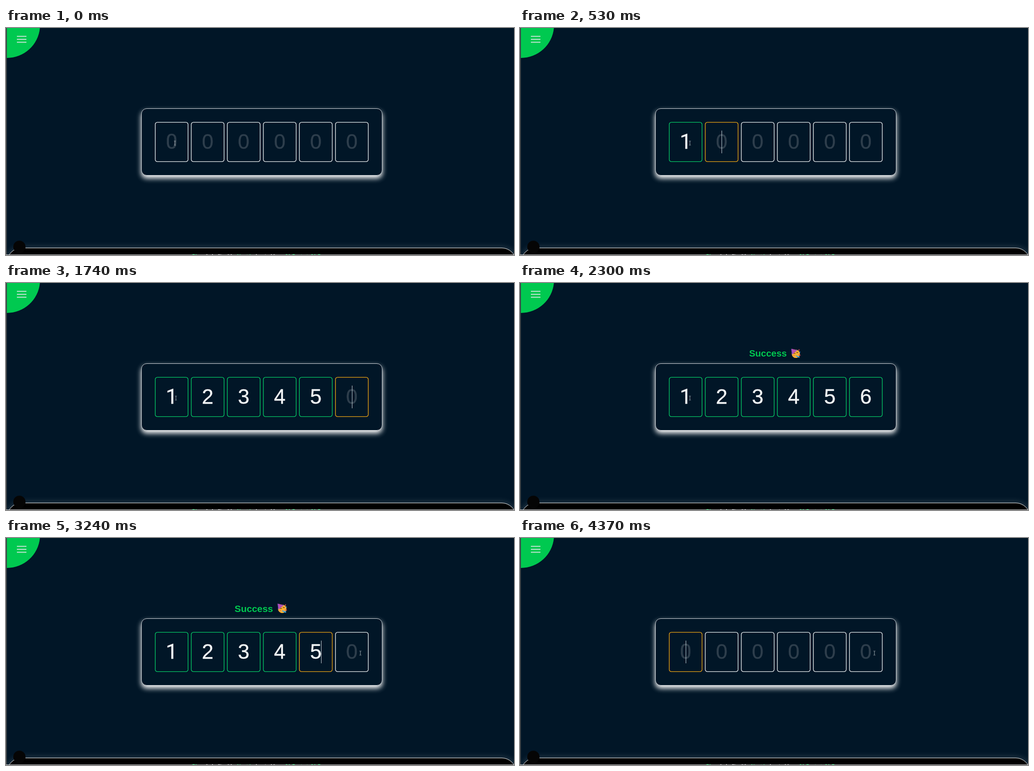
An HTML page that plays this animation: 1119x500 px, repeating every 4.44 s.

```html
<!DOCTYPE html>
<html lang="en">
<head>
<meta charset="utf-8">
<title>Code input</title>
<style>
  html, body { margin: 0; width: 100%; height: 100%; overflow: hidden; background: #011627; }
  #stage { position: relative; width: 1119px; height: 500px; overflow: hidden; background: #011627; }
  #stage > * { position: absolute; box-sizing: border-box; }
  .edge { left: 0; top: 0; width: 2px; height: 500px; background: #3b4044; }
  .base { left: 0; top: 499px; width: 1119px; height: 1px; background: #d9dbdd; }
  .card {
    left: 298px; top: 176.6px; width: 530.5px; height: 148px;
    border: 1px solid #d5d9dd; border-radius: 12px; background: #011627;
    box-shadow: 0 6px 12px #fff;
  }
  .footer {
    left: 2px; top: 484px; width: 1122px; height: 90px;
    border: 1.3px solid #f2f2f2; border-radius: 32px; background: #000;
    box-shadow: 0 0 16px rgba(255, 255, 255, .2);
  }
  svg { left: 0; top: 0; font-family: "Liberation Sans", Arial, sans-serif; }
  .digit { font-size: 45.8px; text-anchor: middle; stroke-width: .4; }
  .digit:first-of-type { font-family: Roboto, sans-serif; }
  .note { font-size: 11px; font-weight: bold; fill: #f3f4f6; }
  .green { fill: #00c950; }
</style>
</head>
<body>
<div id="stage">
  <div class="edge"></div>
  <div class="card"></div>
  <div class="footer"></div>
  <svg width="1119" height="500" viewBox="0 0 1119 500">
    <path class="green" d="M2 0H74.7A73 73 0 0 1 2 66Z"/>
    <path d="M24 18.4H45M24 24.9H45M24 31.4H45" stroke="#e4e7e9" stroke-width="1.7"/>
    <circle cx="29.5" cy="482" r="13.5" fill="#050505"/>
    <g class="note">
      <text x="410" y="505.5" class="green">Pinup</text>
      <text x="441" y="505.5">is built with</text>
      <text x="509" y="505.5" class="green">Next.js</text>
      <text x="550" y="505.5">hosted by:</text>
      <text x="615" y="505.5" class="green">21 Port st, 21 P</text>
    </g>
    <g id="success">
      <text x="500.4" y="163" font-size="22" font-weight="bold" class="green">Success</text>
      <g transform="translate(600 144)">
        <circle cx="11" cy="12" r="9.8" fill="#fdb233"/>
        <path d="M0 0L15 3.5L2 14Z" fill="#9a4fc4"/>
        <path d="M4 1L6 10M8 2L10 7" stroke="#e4558b" stroke-width="1.6"/>
        <path d="M6 12q2-2.5 4 0M12.5 10q2-2.5 4 0" fill="none" stroke="#5b3218" stroke-width="1.3"/>
        <circle cx="6.5" cy="16" r="1.9" fill="#f7863b"/>
        <path d="M10.5 15.5L20.5 18.5L19 21.5L10.5 17.5Z" fill="#3c9bdc"/>
        <path d="M17 14.5q4-1 4.5 2" fill="none" stroke="#e84d55" stroke-width="1.6"/>
        <circle cx="18.5" cy="3" r="1.3" fill="#e84d55"/>
        <circle cx="20.5" cy="8" r="1.2" fill="#3c9bdc"/>
      </g>
    </g>
    <g id="boxes"></g>
    <rect id="caret" y="226" width="1" height="50" fill="#cdd3d8"/>
    <path id="beam" d="M-2-4.5H-.6L0-4L.6-4.5H2M0-4V4M-2 4.5H-.6L0 4L.6 4.5H2"
      fill="none" stroke="#b4bbc1" stroke-width=".9"/>
    <path id="arrow" d="M0 0V11.5L2.7 9L4.5 13L6.4 12.2L4.7 8.3H8.3Z"
      fill="#fff" stroke="#111" stroke-width=".7"/>
  </svg>
  <div class="base"></div>
</div>
<script>
const LOOP = 4440;
const COUNT = 6, PITCH = 79.4;
const WHITE = "#f3f5f6", GREEN = "#06cf68", AMBER = "#f6a912", DIM = "#2e3e4c";

// Key presses and mouse clicks, in ms
const TYPED = [490, 670, 1010, 1340, 1740, 2100];
const ERASED = [3240, 3500, 3700, 3930, 4100, 4370];
const CLICKS = [400, 2470];
const EVENTS = [...TYPED, ...ERASED, ...CLICKS];
const DONE = TYPED[COUNT - 1];

const $ = id => document.getElementById(id);
const ramp = (t, from, to) => Math.min(1, Math.max(0, (t - from) / (to - from)));
const smooth = p => p * p * (3 - 2 * p);
const past = (times, t) => times.filter(time => time <= t);
const boxX = i => 328 + PITCH * i;
const middle = i => boxX(i) + 36.8;

function add(tag, attrs) {
  const el = document.createElementNS("http://www.w3.org/2000/svg", tag);
  for (const key in attrs) el.setAttribute(key, attrs[key]);
  return $("boxes").appendChild(el);
}

const boxes = Array.from({ length: COUNT }, (_, i) => ({
  frame: add("rect", {
    x: boxX(i) + .7, y: 207.6, width: 72.3, height: 86.8, rx: 5,
    fill: "none", "stroke-width": 1.35
  }),
  digit: add("text", { x: middle(i), y: 266.4, class: "digit" })
}));

function focusAt(t, filled) {
  const [first, second] = CLICKS;
  if (t < first || (t >= DONE && t < second)) return -1;
  return t < DONE ? filled : Math.max(0, filled - 1);
}

function drawBoxes(t) {
  const filled = past(TYPED, t).length - past(ERASED, t).length;
  const focus = focusAt(t, filled);
  boxes.forEach(({ frame, digit }, i) => {
    const full = i < filled;
    const ink = full ? WHITE : DIM;
    frame.setAttribute("stroke", i === focus ? AMBER : full ? GREEN : WHITE);
    digit.setAttribute("fill", ink);
    digit.setAttribute("stroke", ink);
    digit.textContent = full ? i + 1 : 0;
  });

  // The caret blinks, starting anew at each event.
  const idle = t - Math.max(0, ...past(EVENTS, t));
  const lit = focus >= 0 && idle % 1000 < 500;
  $("caret").style.display = lit ? "" : "none";
  $("caret").setAttribute("x", Math.floor(middle(focus) + (focus < filled ? 12.5 : .5)));
}

function drawPointer(t) {
  const x = 372 + 2.3 * ramp(t, 70, 300) + 406.4 * smooth(ramp(t, 2310, 2560));
  const inBox = boxes.some((_, i) => x > boxX(i) && x < boxX(i) + 73.5);
  for (const [id, shown] of [["beam", inBox], ["arrow", !inBox]]) {
    $(id).style.display = shown ? "" : "none";
    $(id).setAttribute("transform", `translate(${x} 253.5)`);
  }
}

function drawSuccess(t) {
  const enter = 1 - (1 - ramp(t, DONE, 2400)) ** 2.4;
  const leave = 1 - ramp(t, 3200, 3500) ** 1.5;
  const scale = Math.min(enter, leave);
  $("success").style.display = scale > 0 ? "" : "none";
  $("success").setAttribute("transform", `translate(561.5 155) scale(${scale}) translate(-561.5 -155)`);
}

const start = performance.now();
function draw() {
  const t = (performance.now() - start) % LOOP;
  drawBoxes(t);
  drawPointer(t);
  drawSuccess(t);
  requestAnimationFrame(draw);
}
draw();
</script>
</body>
</html>
```
